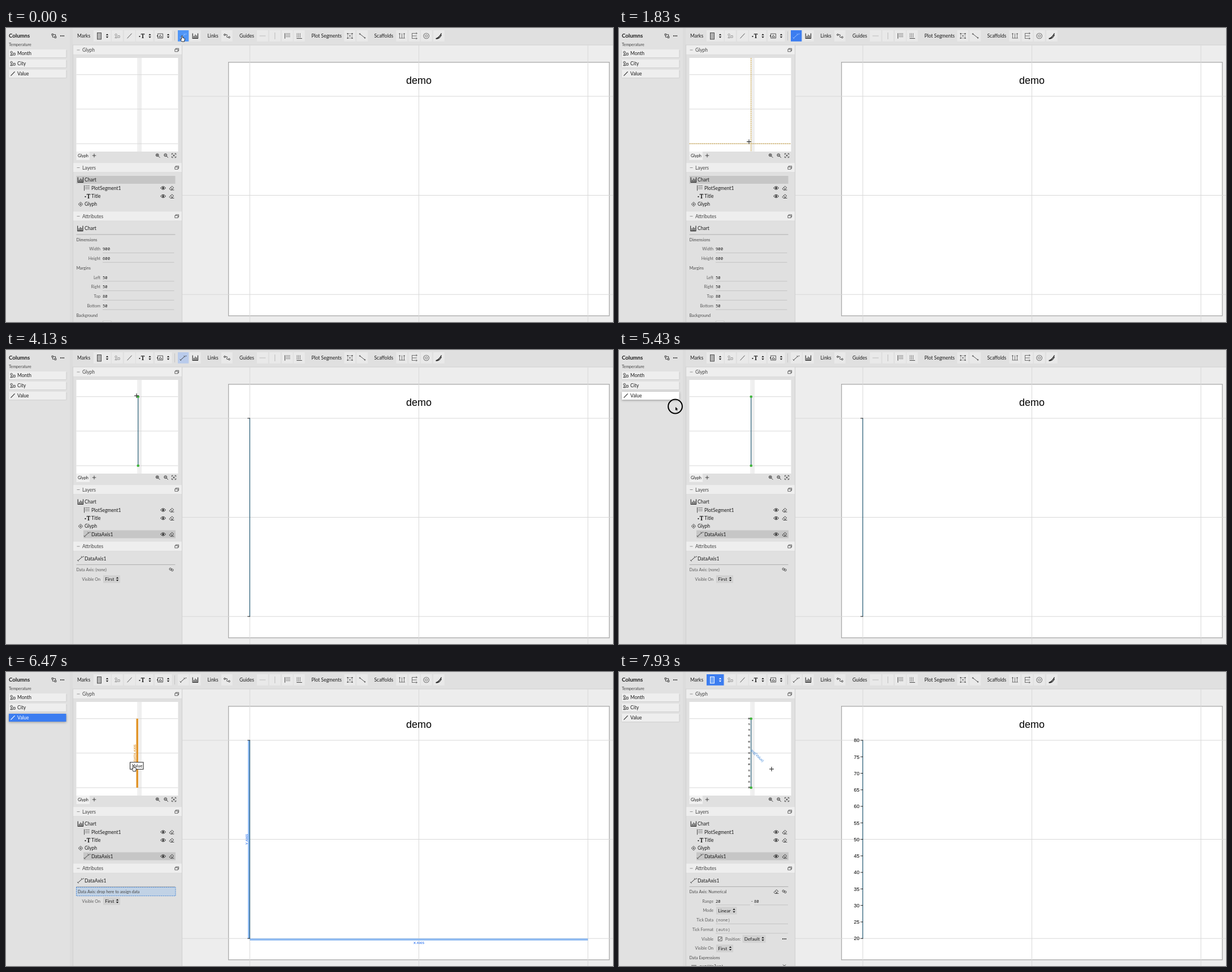
An HTML page with a canvas that plays this animation: 1074 by 521 pixels, repeating every 8 s.

```html
<!DOCTYPE html>
<html lang="en">
<head>
<meta charset="utf-8">
<title>Chart editor demo</title>
<style>
html, body { margin: 0; width: 100%; height: 100%; overflow: hidden; background: #e0e0e0; }
canvas { display: block; width: 1074px; height: 521px; }
</style>
</head>
<body>
<canvas id="stage"></canvas>
<script>
const W = 1074, H = 521, LOOP = 8000;
const canvas = document.getElementById('stage'), c = canvas.getContext('2d');
const ratio = window.devicePixelRatio || 1;
canvas.width = W * ratio;
canvas.height = H * ratio;

const SANS = 'Lato, sans-serif', MONO = '"Noto Sans Mono", monospace', ARIAL = '"Liberation Sans", Arial, sans-serif';
const INK = '#1a1a1a', GREY = '#5c5c5c', BLUE = '#3c7df0', AXIS = '#245a74', GUIDE = '#d8d8d8';

// Event times in ms
const PRESS = 1950, CREATED = 3950, GRAB = 5370, DRAG = 5500, DROP = 6650, RECT_TOOL = 7450;

function rect(x, y, w, h, fill, stroke, width = 1) {
  if (fill) { c.fillStyle = fill; c.fillRect(x, y, w, h); }
  if (stroke) { c.strokeStyle = stroke; c.lineWidth = width; c.strokeRect(x, y, w, h); }
}
function line(x1, y1, x2, y2, color, width = 1, dash = []) {
  c.strokeStyle = color;
  c.lineWidth = width;
  c.setLineDash(dash);
  c.beginPath();
  c.moveTo(x1, y1);
  c.lineTo(x2, y2);
  c.stroke();
  c.setLineDash([]);
}
function disc(x, y, r, fill, stroke, width = 1) {
  c.beginPath();
  c.arc(x, y, r, 0, 7);
  if (fill) { c.fillStyle = fill; c.fill(); }
  if (stroke) { c.strokeStyle = stroke; c.lineWidth = width; c.stroke(); }
}
// y is the middle of the capitals
function text(s, x, y, size = 8.5, { color = INK, align = 'left', font = SANS, weight = 400, turn = 0 } = {}) {
  c.save();
  c.translate(x, y);
  c.rotate(turn);
  c.font = `${weight} ${size}px ${font}`;
  c.fillStyle = color;
  c.textAlign = align;
  c.fillText(s, 0, size * 0.36);
  c.restore();
}
function icon(d, x, y, stroke = '#333', fill, width = 0.9) {
  const p = new Path2D(d);
  c.save();
  c.translate(x, y);
  if (fill) { c.fillStyle = fill; c.fill(p); }
  if (stroke) { c.strokeStyle = stroke; c.lineWidth = width; c.stroke(p); }
  c.restore();
}

const ring = (x, y, r) => `M${x - r} ${y}a${r} ${r} 0 1 0 ${2 * r} 0a${r} ${r} 0 1 0 ${-2 * r} 0`;
const ICON = {
  category: ring(-2.4, -2, 1.7) + 'M-4.2 3.6L-2.3 .6L-.4 3.6ZM.8-.4h3.4v3.4h-3.4z',
  slash: 'M-3.5 3.6L3.5-3.6',
  axis: 'M-4 3.8L3-2.6M-5.3 2.6L-3.2 5M1.8-4L3.8-1.6M4.4-3.4h2',
  bars: 'M-4.8-4.6V4.5H5M-2.4 4V0M0 4V-2.2M2.3 4V-.8M4.5 4V-4.6',
  carets: 'M-2.2-1.1L0-3.8L2.2-1.1ZM-2.2 1.1L0 3.8L2.2 1.1Z',
  image: 'M-4.5-3.8h9v7.8h-9zM-2.5 2L0-1.5L2.8 2Z',
  link: ring(-4, -2, 1.4) + ring(4, 2.4, 1.4) + 'M-2.6-2C5-4-5 4 2.6 2.4',
  region: 'M-3.8-3.8h7.6v7.6h-7.6z',
  corners: 'M-5-5h2v2h-2zM3-5h2v2h-2zM-5 3h2v2h-2zM3 3h2v2h-2zM-1-1h2v2h-2z',
  window: 'M-3.2-1.2V2.8H2.2V-1.2ZM-1.8-1.2V-2.8H3.6V1.4H2.2',
  zoom: ring(-0.8, -0.8, 2.4) + 'M1.1 1.1L3.8 3.8M-2-.8H.4',
  plusBar: 'M-.8-2V.4',
  fit: 'M-3.6-1.4V-3.6H-1.4M1.4-3.6H3.6V-1.4M3.6 1.4V3.6H1.4M-1.4 3.6H-3.6V1.4M-1.8-1.8L1.8 1.8M1.8-1.8L-1.8 1.8',
  eye: 'M-4.4 0Q0-5.4 4.4 0Q0 5.4-4.4 0Z',
  eraser: 'M-4 1.4L.6-3.2L3.8-.4L-.2 3.4H-2.2ZM-1.8-.8L1.5 2.2M-1 3.5H4.4',
  chain: ring(-1.7, -0.8, 1.8) + ring(1.7, 0.9, 1.8),
  diamond: 'M-4 0L0-3.8L4 0L0 3.8ZM-1.6 0h3.2M0-1.8V1.8',
  swap: 'M-4-3.6h2.6v2.6h-2.6zM1 .8h2.8v2.8H1zM-2.6-.6V2.2H.6M2.6.4V-2.4H-.6',
  arrow: 'M0 0V8L1.9 6.3L3.2 9L4.5 8.4L3.3 5.8H5.8Z',
  hand: 'M-1 0Q0-1.2 1 0V3.4L4 4Q5 4.4 4.8 6L4 10H-.4L-3.2 6.4Q-3.4 5-1 6.2Z'
};

function dotRows(x, y, color, turned) {
  c.save();
  c.translate(x, y);
  if (turned) c.rotate(-Math.PI / 2);
  line(-4.5, -4.8, -4.5, 4.8, color);
  for (let r = -4; r <= 4; r += 2.7) line(-2.5, r, 5, r, color, 1, [1.4, 0.9]);
  c.restore();
}
function textMark(x, y) {
  text('·', x - 5, y, 10, { weight: 900 });
  text('T', x + 2, y, 10, { font: '"Noto Serif", serif', weight: 700, align: 'center' });
}
function dots(x, y) {
  for (const d of [-2.7, 0, 2.7]) disc(x + d, y, 0.9, INK);
}
function mix(a, b, k) {
  return `rgb(${a.map((v, i) => Math.round(v + (b[i] - v) * k))})`;
}

// Pointer way-points: time, x, y
const PATH = [
  [0, 312, 14], [400, 312, 14], [830, 303, 16], [900, 303, 16], [1690, 230, 201.5], [1960, 230, 201.5],
  [2430, 224, 77.5], [2900, 223.5, 77.5], [3430, 231, 81], [4150, 231, 81], [4430, 214, 85], [4470, 214, 85],
  [5170, 97, 78], [5370, 97, 78], [5430, 99.5, 100], [6170, 200, 150], [6470, 226, 166], [6700, 226, 166],
  [7000, 200, 100], [7400, 168, 13], [7560, 168, 13], [7830, 255, 98], [7930, 270, 172], [8000, 270, 172]
];
function pointer(t) {
  const i = PATH.findIndex(p => p[0] > t), [t0, x0, y0] = PATH[i - 1], [t1, x1, y1] = PATH[i];
  const k = (t - t0) / (t1 - t0), e = k * k * (3 - 2 * k);
  return { x: x0 + (x1 - x0) * e, y: y0 + (y1 - y0) * e };
}
const GLYPH_X = [233.7, 236.3, 238.8], GLYPH_Y = [82.7, 143.7, 205];
const snap = (v, list) => list.find(g => Math.abs(g - v) < 7);

function columns(s) {
  rect(0, 0, 113, H, '#e1e1e1');
  rect(113, 0, 5, H, '#dcdcdc');
  line(118.5, 0, 118.5, H, '#d0d0d0');
  text('Columns', 5, 14, 9.6, { weight: 700 });
  icon(ICON.swap, 85, 14);
  dots(99.5, 14);
  text('Temperature', 5, 29.5, 7.2, { color: '#444' });
  ['Month', 'City', 'Value'].forEach((name, i) => {
    const y = 38 + 18 * i, on = i === 2 && s.dragging, hot = i === 2 && s.hover;
    c.save();
    c.shadowColor = on || hot ? 'rgba(0,0,0,.35)' : 'rgba(0,0,0,.18)';
    c.shadowBlur = (on || hot ? 4 : 1.5) * ratio;
    c.shadowOffsetY = (on || hot ? 1 : 0.5) * ratio;
    rect(5, y, 101.5, 14, on ? BLUE : hot ? '#fff' : '#eeeeee');
    c.restore();
    const color = on ? '#fff' : INK;
    icon(i < 2 ? ICON.category : ICON.slash, 12, y + 7, on ? '#fff' : '#333', null, i < 2 ? 0.9 : 1.2);
    text(name, 20, y + 7, 8.5, { color });
  });
}

function toolbar(s) {
  rect(118, 0, W - 118, 30, '#e0e0e0');
  line(118, 30, W, 30, '#d2d2d2');
  const labels = { Marks: 126, Links: 356.5, Guides: 413, 'Plot Segments': 540.5, Scaffolds: 651.5 };
  for (const name in labels) text(name, labels[name], 14);
  const buttons = [155, 187, 209, 230, 263, 304, 325, 381, 444, 466, 488, 509, 598.5, 620.5, 690.5, 712.5, 734, 756];
  buttons.forEach((x, i) => rect(x, 4, [0, 3, 4].includes(i) ? 30.5 : 19.7, 19.8, '#e9e9e9'));
  line(298.5, 6, 298.5, 22, '#c4c4c4');

  if (s.rectTool) rect(155, 4, 30.5, 19.8, BLUE);
  rect(161.5, 8.5, 7, 11.5, s.rectTool ? '#6fa4f7' : '#b0b0b0', s.rectTool ? '#fff' : '#444', 0.9);
  [179, 254.5, 287].forEach((x, i) => icon(ICON.carets, x, 14, null, !i && s.rectTool ? '#fff' : INK));
  icon(ICON.category, 197, 14, '#999', null, 1);
  icon('M-4 4.3L4-4.3', 218.5, 14, '#444');
  textMark(240, 14);
  icon(ICON.image, 273, 14, '#444');
  disc(268, 14, 1, INK);

  if (s.toolColor) rect(304, 4, 19.3, 19.8, s.toolColor);
  icon(ICON.axis, 313, 14, s.lightIcon ? '#a9cbff' : '#333');
  icon(ICON.bars, 335, 14, '#222', null, 1.1);
  icon(ICON.link, 391, 14);
  line(448.5, 14, 459.5, 14, '#bbb');
  line(475.8, 8, 475.8, 20, '#bbb');
  dotRows(498, 14, '#444');
  dotRows(519, 14, '#444', true);
  icon(ICON.region, 608.5, 14, '#888', null, 0.8);
  icon(ICON.corners, 608.5, 14, null, '#555');
  icon('M-4.5-3.5L4.5 3.5' + ring(-4.5, -3.5, 0.8) + ring(4.5, 3.5, 0.8), 630.5, 14, '#444');
  icon('M-5 4H5.5M-4-4.5V4M0-4.5V4M4-4.5V4M-5.3-3L-4-4.8L-2.7-3M2.7-3L4-4.8L5.3-3', 700.5, 14, '#555', null, 0.8);
  icon('M-4-5V5M-4-4.5H4.5M-4 0H4.5M-4 4.5H4.5M3-6L5-4.5L3-3M3 3L5 4.5L3 6', 722.5, 14, '#555', null, 0.8);
  disc(743.7, 14, 4.8, null, '#777', 1.1);
  disc(743.7, 14, 2, null, '#777');
  icon('M-5 4.6Q0 4 5-4.6M-5 5Q2 5.5 5-2', 765.5, 14, '#222', null, 1.2);
}

function header(name, y) {
  rect(119, y - 8.3, 192, 16.6, '#eeeeee');
  line(119, y + 8.3, 311, y + 8.3, '#d6d6d6', 0.7);
  line(125.5, y, 130.5, y, '#888', 0.9);
  text(name, 135, y, 8.5, { color: '#444' });
  icon(ICON.window, 302, y, '#444', null, 0.8);
}

function glyphPanel(s) {
  header('Glyph', 39);
  rect(124.5, 53, 180, 166, '#fff');
  GLYPH_X.forEach(x => line(x, 53, x, 219, GUIDE));
  GLYPH_Y.forEach(y => line(124.5, y, 304.5, y, GUIDE));
  const [x, , ] = GLYPH_X, [top, mid, bottom] = GLYPH_Y;
  if (s.snapX) line(s.snapX, 53, s.snapX, 219, '#c99a2c', 1, [2.4, 1.2]);
  if (s.snapY) line(124.5, s.snapY, 304.5, s.snapY, s.drawing ? '#cf8a4c' : '#c99a2c', 1, [2.4, 1.2]);
  if (s.drawing) line(x, bottom, s.snapX || s.x, s.snapY || s.y, '#62a0dc');
  if (s.created && !s.dragging) {
    line(x, top, x, bottom, AXIS, 1.2);
    if (s.bound) {
      for (let v = 20; v <= 80; v += 5)
        text(v, 232.2, bottom - (v - 20) / 60 * (bottom - top), 3.4, { align: 'right', font: ARIAL, weight: 700 });
      text('avg(Value)', 234.5, 137.5, 6.6, { color: '#3f86d8', turn: Math.PI / 4 });
    }
    disc(x, top, 2.3, '#3db53a');
    disc(x, bottom, 2.3, '#3db53a');
  }
  if (s.dragging) {
    rect(230.4, top, 3.6, bottom - top, s.over ? '#e2962c' : '#8db9f0');
    text('DATA AXIS', 228, mid, 6.1, { color: s.over ? '#dc9128' : BLUE, align: 'center', weight: 700, turn: -Math.PI / 2 });
  }
  rect(124.5, 219, 23.5, 15, '#f0f0f0');
  text('Glyph', 127, 226, 7.3);
  icon('M-3.3 0H3.3M0-3.3V3.3', 156, 226);
  icon(ICON.zoom + ICON.plusBar, 268.5, 226, '#222');
  icon(ICON.zoom, 283, 226, '#222');
  icon(ICON.fit, 297, 226, '#222', null, 0.8);
}

function rowTools(y) {
  icon(ICON.eye, 278, y, '#111');
  disc(278, y, 1.5, '#111');
  icon(ICON.eraser, 293, y, '#222', null, 0.8);
}
function layers(s) {
  header('Layers', 247.5);
  if (s.created) rect(137, 319.5, 163, 14, '#c6c6c6');
  else rect(124.5, 262, 175, 14, '#c6c6c6');
  icon(ICON.bars, 132, 269, '#222', null, 1.1);
  text('Chart', 139, 269);
  dotRows(143, 283.5, '#444');
  text('PlotSegment1', 151, 283.5);
  rowTools(283.5);
  textMark(144, 298);
  text('Title', 151, 298);
  rowTools(298);
  icon(ICON.diamond, 132, 312.3, '#444');
  text('Glyph', 139, 312.3);
  if (s.created) {
    icon(ICON.axis, 143, 326.5, '#333');
    text('DataAxis1', 151, 326.5);
    rowTools(326.5);
  }
}

const label = (s, y) => text(s, 167, y, 7.2, { color: GREY, align: 'right' });
const caption = (s, y, color = '#4a4a4a') => text(s, 124.5, y, 7.2, { color });
function field(s, x, y, right, color = INK) {
  text(s, x, y, 7.2, { font: MONO, color });
  line(x, y + 6.8, right, y + 6.8, '#bdbdbd', 0.8);
}
function select(s, x, y, w) {
  rect(x, y - 6.7, w, 13.4, '#d1d1d1');
  text(s, x + 3.2, y, 8.3);
  icon(ICON.carets, x + w - 5, y, null, INK);
}

function attributes(s) {
  const y = s.created ? 348 : 333.6;
  header('Attributes', y);
  icon(s.created ? ICON.axis : ICON.bars, 131.5, y + 21.5, '#222', null, s.created ? 0.9 : 1.1);
  text(s.created ? 'DataAxis1' : 'Chart', 139, y + 21.5);
  line(124.5, y + 32.4, 299.5, y + 32.4, '#aaa', 0.9);

  if (!s.created) {
    caption('Dimensions', 375);
    caption('Margins', 425.3);
    [['Width', 900, 391.7], ['Height', 600, 408.5], ['Left', 50, 442], ['Right', 50, 458.8], ['Top', 80, 475.5], ['Bottom', 50, 492.3]]
      .forEach(([name, value, row]) => { label(name, row); field(value, 171, row, 297.5); });
    caption('Background', 509);
    rect(171.5, 519.3, 14.5, 8, '#f4f4f4', '#c2c2c2', 0.8);
  } else if (!s.bound) {
    if (s.dragging) {
      rect(124.5, 381.5, 175.5, 15.2, '#c1d2e5');
      c.setLineDash([2, 1.3]);
      rect(124.5, 381.5, 175.5, 15.2, null, '#3f82d4');
      c.setLineDash([]);
      text('Data Axis: drop here to assign data', 127, 389, 7.2, { color: '#444' });
    } else {
      caption('Data Axis: (none)', 389, GREY);
      icon(ICON.chain, 292.5, 389, '#222', null, 0.8);
    }
    label('Visible On', 406);
    select('First', 172, 406, 30);
  } else {
    caption('Data Axis: Numerical', 389);
    icon(ICON.eraser, 278, 389, '#222', null, 0.8);
    icon(ICON.chain, 292.5, 389, '#222', null, 0.8);
    label('Range', 406);
    field(20, 171, 406, 232);
    text('-', 234, 406, 7.2);
    field(80, 239, 406, 299);
    label('Mode', 422.8);
    select('Linear', 172, 422.8, 36.5);
    label('Tick Data', 439.5);
    field('(none)', 171, 439.5, 299, GREY);
    label('Tick Format', 456.2);
    field('(auto)', 171, 456.2, 299, GREY);
    label('Visible', 473);
    rect(175.5, 469.7, 6.6, 6.6, '#eee', '#333', 0.8);
    icon('M-2 0L-.5 1.7L2.2-2', 178.8, 473, '#222');
    text('Position:', 188, 473, 7.2, { color: GREY });
    select('Default', 218.5, 473, 41);
    dots(292.5, 473);
    label('Visible On', 489.8);
    select('First', 172, 489.8, 30);
    caption('Data Expressions', 506.5);
    line(128, 520, 137, 520, '#555');
    text('avg(Value)', 142, 521.5, 7.2, { font: MONO });
    icon('M-2.5-2.5L2.5 2.5M2.5-2.5L-2.5 2.5', 292.5, 521);
  }
}

function page(s) {
  rect(312, 30.5, W - 312, H - 30.5, '#ededed');
  line(311.5, 30, 311.5, H, '#cfcfcf');
  rect(393.7, 60.7, 673.8, 449.3, '#fff', '#adadad', 1.4);
  [431.4, 730.5, 1029.7].forEach(x => line(x, 31, x, H, GUIDE));
  [121, 296.5, 472.2].forEach(y => line(312, y, W, y, GUIDE));
  text('demo', 730.5, 93, 18, { color: '#000', align: 'center', font: ARIAL });
  if (s.dragging) {
    rect(428, 121, 4, 351, '#8db9f0');
    rect(431.4, 472.2, 598.3, 3.6, '#8db9f0');
    const tag = { color: BLUE, align: 'center', weight: 700 };
    text('Y AXIS', 426, 296.5, 6.1, { ...tag, turn: -Math.PI / 2 });
    text('X AXIS', 730.5, 479.7, 6.1, tag);
  }
  if (!s.created) return;
  line(431.4, 121, 431.4, 472.2, AXIS, 1.2);
  for (let v = 20; v <= 80; v += s.bound ? 5 : 60) {
    const y = 472.2 - (v - 20) / 60 * 351.2;
    line(427.3, y, 431.9, y, '#222');
    if (s.bound) text(v, 425.6, y, 9, { color: '#000', align: 'right', font: ARIAL });
  }
}

function cursor(s, t) {
  const { x, y } = s;
  if (s.dragging) {
    rect(x - 6.5, y - 6, 23.5, 12.3, '#fff', '#222');
    text('Value', x - 3, y, 7.6);
  }
  if ((t >= PRESS && t < CREATED) || (t >= GRAB && t < DRAG + 60) || (t >= 7420 && t < 7560))
    disc(x, y, 12.4, null, '#000', 2);
  if (s.cross) {
    line(x - 4, y, x + 4, y, '#111');
    line(x, y - 4, x, y + 4, '#111');
  } else if (s.dragging || s.hand) icon(ICON.hand, x - 0.5, y, '#111', '#fff');
  else icon(ICON.arrow, x, y, '#fff', '#000', 0.7);
}

function stateAt(t) {
  const s = pointer(t), { x, y } = s;
  const inGlyph = x > 124 && x < 304 && y > 53 && y < 219;
  const axisTool = t < CREATED;
  s.created = t >= CREATED;
  s.bound = t >= DROP;
  s.dragging = t >= DRAG && t < DROP;
  s.drawing = t >= PRESS && t < CREATED;
  s.rectTool = t >= RECT_TOOL;
  s.over = Math.abs(x - 232) < 14;
  s.hover = (x < 107 && y > 73 && y < 89) || (t >= GRAB && t < DRAG);
  s.hand = (s.hover && t < GRAB) || (y < 25 && (x > 304 || x < 187));
  s.cross = (inGlyph && (axisTool || s.rectTool)) || (t >= CREATED && t < 4250);
  if (inGlyph && (axisTool || s.rectTool)) {
    s.snapX = snap(x, GLYPH_X);
    s.snapY = snap(y, GLYPH_Y);
  }
  const fade = (t - CREATED) / 250;
  s.lightIcon = axisTool;
  if (axisTool) s.toolColor = t < 30 ? '#4f95f6' : BLUE;
  else if (fade < 1) s.toolColor = mix([60, 125, 240], [233, 233, 233], fade);
  return s;
}

function frame() {
  const t = performance.now() % LOOP, s = stateAt(t);
  c.setTransform(ratio, 0, 0, ratio, 0, 0);
  rect(0, 0, W, H, '#e0e0e0');
  page(s);
  columns(s);
  toolbar(s);
  glyphPanel(s);
  layers(s);
  attributes(s);
  cursor(s, t);
  requestAnimationFrame(frame);
}
frame();
</script>
</body>
</html>
```
